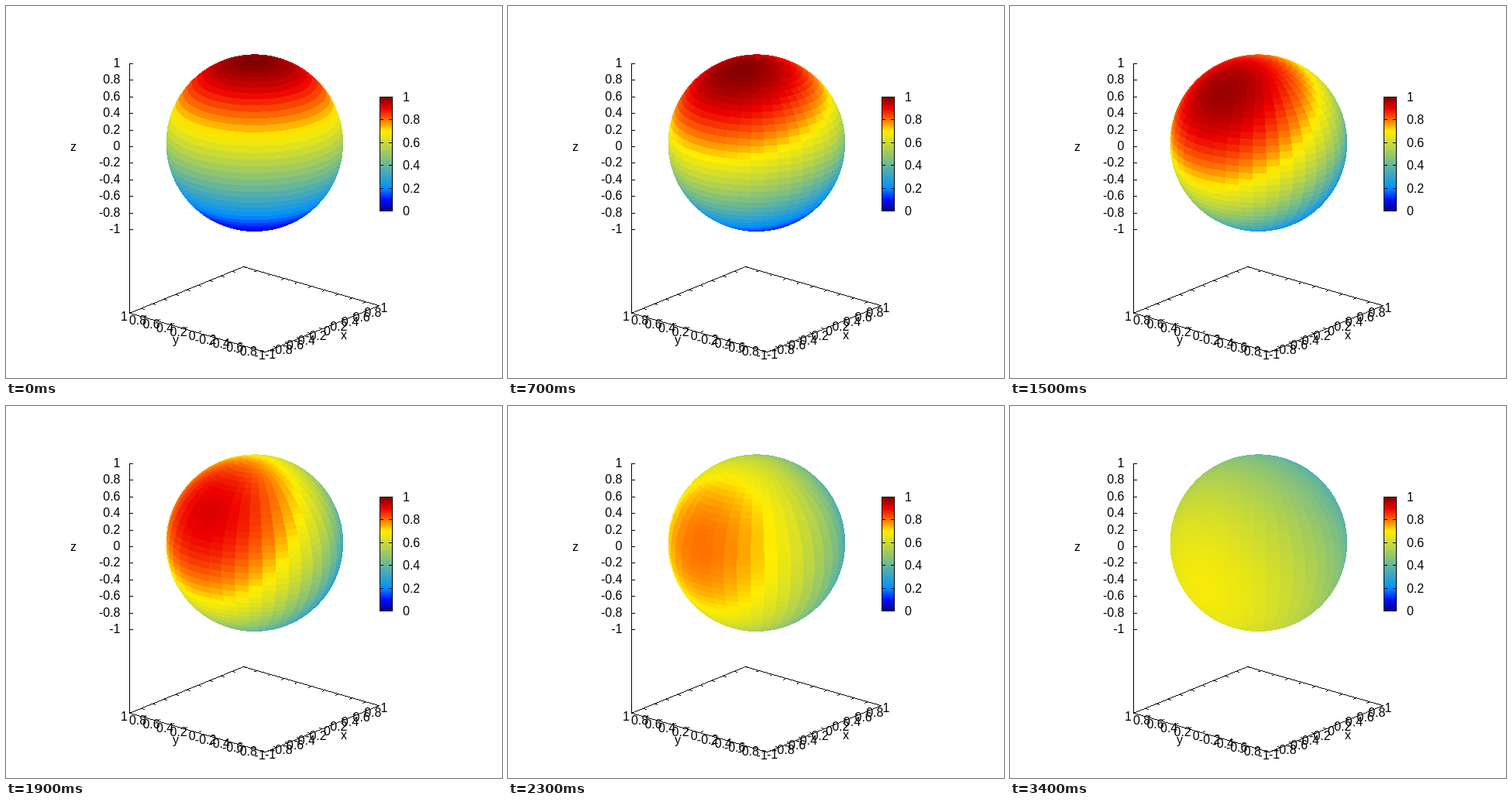
An HTML page with a canvas that plays this animation: 640 px wide and 480 px high, repeating every 4.1 s.

```html
<!DOCTYPE html>
<html lang="en">
<head>
<meta charset="utf-8">
<title>Sphere plot</title>
<style>
html, body { margin: 0; width: 100%; height: 100%; overflow: hidden; background: #fff; }
canvas { display: block; width: 640px; height: 480px; }
</style>
</head>
<body>
<canvas id="stage" width="640" height="480"></canvas>
<script>
const ctx = document.getElementById('stage').getContext('2d');
const CX = 320.3, CY = 176.2, R = 114.3, N = 40;
const rad = deg => deg * Math.PI / 180;
const cosA = Math.cos(rad(50)), sinA = Math.sin(rad(50));
const cosT = Math.cos(rad(70)), sinT = Math.sin(rad(70));

const palette = [
  [0, 0, 0, 144], [0.1, 0, 15, 255], [0.2, 0, 144, 255], [0.7, 255, 238, 0],
  [0.8, 255, 112, 0], [0.9, 238, 0, 0], [1, 127, 0, 0]
];

function colour(v) {
  v = Math.min(1, Math.max(0, v));
  let i = 1;
  while (i < palette.length - 1 && v > palette[i][0]) i++;
  const a = palette[i - 1], b = palette[i];
  const f = (v - a[0]) / (b[0] - a[0]);
  return [1, 2, 3].map(k => Math.round(a[k] + (b[k] - a[k]) * f));
}

// ---- Axes ----
function project(x, y, z) {
  return [
    CX + R * (cosA * x - sinA * y),
    CY - R * (cosT * (sinA * x + cosA * y) + sinT * z)
  ];
}

function line(x0, y0, x1, y1) {
  const n = Math.max(1, Math.round(Math.max(Math.abs(x1 - x0), Math.abs(y1 - y0))));
  for (let i = 0; i <= n; i++) {
    ctx.fillRect(Math.round(x0 + (x1 - x0) * i / n), Math.round(y0 + (y1 - y0) * i / n), 1, 1);
  }
}

function label(s, x, y, align) {
  ctx.textAlign = align;
  ctx.fillText(s, x, y);
}

function tick(p, dx, dy) {
  line(p[0], p[1], p[0] + dx, p[1] + dy);
}

function drawAxes() {
  ctx.fillStyle = '#fff';
  ctx.fillRect(0, 0, 640, 480);
  ctx.fillStyle = '#000';
  ctx.font = '16px "Liberation Sans", Arial, sans-serif';
  ctx.textBaseline = 'alphabetic';

  const corners = [[-1, 1], [-1, -1], [1, -1], [1, 1]].map(c => project(c[0], c[1], -2));
  corners.forEach((p, i) => line(...p, ...corners[(i + 1) % 4]));
  line(...corners[0], ...project(-1, 1, 1));

  for (let i = -5; i <= 5; i++) {
    const v = i / 5, s = String(v);
    const pz = project(-1, 1, v), px = project(v, -1, -2), py = project(-1, v, -2);
    tick(pz, 4, 0);
    tick(px, -3.8, -1.1);
    tick(project(v, 1, -2), 3.8, 1.1);
    tick(py, 3.7, -1.5);
    tick(project(1, v, -2), -3.7, 1.5);
    label(s, 147.5, Math.round(pz[1]) + 5, 'right');
    label(s, px[0] + 6.7, Math.round(px[1]) + 9, 'center');
    label(s, py[0] - 6.7, Math.round(py[1]) + 10, 'center');
  }
  label('z', 87, 187, 'center');
  label('y', 219, 436, 'center');
  label('x', 436, 430, 'center');
}

function drawColourBar() {
  const left = 482, right = 498, top = 117, bottom = 264;
  for (let y = top; y <= bottom; y++) {
    ctx.fillStyle = `rgb(${colour((bottom - y) / (bottom - top))})`;
    ctx.fillRect(left, y, right - left, 1);
  }
  ctx.fillStyle = '#000';
  line(left, top, right, top);
  line(left, bottom, right, bottom);
  line(left, top, left, bottom);
  line(right, top, right, bottom);
  for (let i = 0; i <= 5; i++) {
    const y = Math.round(bottom - (bottom - top) * i / 5);
    line(left, y, left + 4, y);
    line(right - 4, y, right, y);
    label(String(i / 5), 512, y + 6, 'left');
  }
}

// ---- Sphere: each pixel belongs to one cell of an N by N grid ----
const X0 = 205, Y0 = 61, SIZE = 231;
const image = ctx.createImageData(SIZE, SIZE);
const cellOf = new Int16Array(SIZE * SIZE).fill(-1);

for (let j = 0; j < SIZE; j++) {
  for (let i = 0; i < SIZE; i++) {
    const r = (X0 + i - CX) / R, u = (CY - Y0 - j) / R;
    const dd = 1 - r * r - u * u;
    if (dd < 0) continue;
    const d = Math.sqrt(dd);
    const back = cosT * u - sinT * d;
    const x = cosA * r + sinA * back;
    const y = -sinA * r + cosA * back;
    const z = sinT * u + cosT * d;
    const lat = Math.min(N - 1, Math.floor(Math.acos(Math.min(1, Math.max(-1, z))) / Math.PI * N));
    const turn = (Math.atan2(y, x) / (2 * Math.PI) + 1) % 1;
    cellOf[j * SIZE + i] = lat * N + Math.min(N - 1, Math.floor(turn * N));
  }
}

// Mean x and z over the corners of each cell
const cells = [];
for (let a = 0; a < N; a++) {
  const t0 = Math.PI * a / N, t1 = Math.PI * (a + 1) / N;
  for (let b = 0; b < N; b++) {
    const p0 = 2 * Math.PI * b / N, p1 = 2 * Math.PI * (b + 1) / N;
    cells.push({
      x: (Math.sin(t0) + Math.sin(t1)) * (Math.cos(p0) + Math.cos(p1)) / 4,
      z: (Math.cos(t0) + Math.cos(t1)) / 2
    });
  }
}

// step, tilt in degrees, length of the state vector
const keys = [
  [0, 0, 1], [7, 17, 0.99], [11, 27, 0.98], [15, 38, 0.955], [19, 54, 0.835],
  [21, 65, 0.705], [25, 85, 0.515], [29, 98, 0.41], [34, 106, 0.365]
];

function slope(i, k) {
  const a = keys[Math.max(0, i - 1)], b = keys[Math.min(keys.length - 1, i + 1)];
  return (b[k] - a[k]) / (b[0] - a[0]);
}

function curve(s, k) {
  let i = 0;
  while (i < keys.length - 2 && s > keys[i + 1][0]) i++;
  const a = keys[i], b = keys[i + 1], h = b[0] - a[0];
  const f = (s - a[0]) / h, f2 = f * f, f3 = f2 * f;
  return a[k] * (2 * f3 - 3 * f2 + 1) + b[k] * (3 * f2 - 2 * f3)
    + h * slope(i, k) * (f3 - 2 * f2 + f) + h * slope(i + 1, k) * (f3 - f2);
}

function drawSphere(step) {
  const tilt = rad(curve(step, 1)), len = curve(step, 2);
  const sx = -len * Math.sin(tilt), sz = len * Math.cos(tilt);
  const colours = cells.map(c => colour((1 + sx * c.x + sz * c.z) / 2));
  cellOf.forEach((id, i) => {
    const c = id < 0 ? [255, 255, 255] : colours[id];
    image.data.set(c, i * 4);
    image.data[i * 4 + 3] = 255;
  });
  ctx.putImageData(image, X0, Y0);
}

// The last steps are held: the state has nearly settled
function stepAt(ms) {
  const n = Math.floor(ms / 100);
  if (n >= 34) return 34;
  if (n >= 29) return 29;
  return Math.min(n, 27);
}

let shown = -1;
const start = performance.now();

function render(now) {
  const step = stepAt(Math.max(0, now - start) % 4100);
  if (step !== shown) {
    drawSphere(step);
    shown = step;
  }
  requestAnimationFrame(render);
}

drawAxes();
drawColourBar();
render(start);
</script>
</body>
</html>
```
